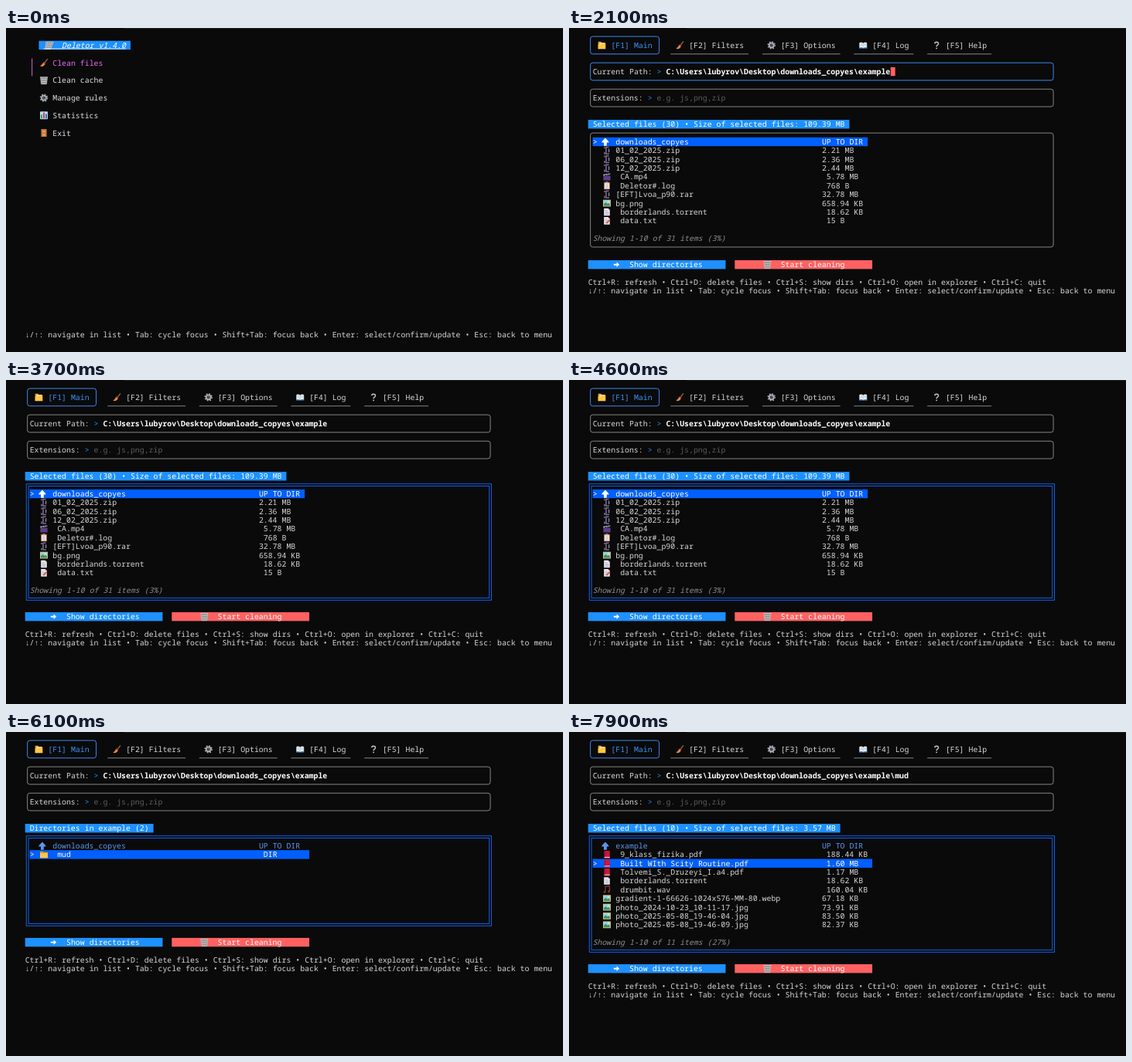
An HTML page for the animation above (8 s loop, 720x420 px).

```html
<!DOCTYPE html>
<html lang="en">
<head>
<meta charset="utf-8">
<title>Deletor</title>
<style>
  html, body { margin: 0; width: 100%; height: 100%; overflow: hidden; background: #0a0a0a; }
  svg { display: block; width: 720px; height: 420px; }
  text {
    font: 9.875px "Noto Sans Mono", "DejaVu Sans Mono", monospace;
    white-space: pre;
    text-rendering: geometricPrecision;
  }
  .bold { font-weight: 700; }
  .ital { font-style: italic; }
  .scene { visibility: hidden; }
</style>
</head>
<body>
<svg id="stage" viewBox="0 0 720 420">
  <defs>
    <g id="broom">
      <path d="M4.8-5L.4.6" stroke="#8d5a48" stroke-width="1.5"/>
      <path d="M-.8-.6L1.6 1.2Q.6 4.4-2.6 4.8L-5 4.2Q-2 2.6-.8-.6Z" fill="#e8893c"/>
      <path d="M-.9-.5L1.5 1.4" stroke="#c8433a" stroke-width="1.3"/>
    </g>
    <g id="bin">
      <path d="M-4.6-4H4.6L3.4 5H-3.4Z" fill="#777"/>
      <path d="M-5-4.2H5M-3.6-1.4H3.6M-3.3 1.6H3.3M-2.4-4L-1.8 5M0-4V5M2.4-4L1.8 5M-4.4-4L-3.4 4.8H3.4L4.4-4" fill="none" stroke="#cfcfcf" stroke-width=".8"/>
    </g>
    <g id="gear" fill="none" stroke="#a9acb3">
      <circle r="4.4" stroke-width="1.7" stroke-dasharray="1.73"/>
      <circle r="2.9" stroke-width="2"/>
      <circle r=".8" stroke-width=".7"/>
    </g>
    <g id="chart">
      <rect x="-5" y="-5" width="10" height="10" rx=".8" fill="#b9dcf0"/>
      <path d="M-3 4V-1" stroke="#35a45c" stroke-width="2"/>
      <path d="M0 4V-3.8" stroke="#d8404e" stroke-width="2"/>
      <path d="M3 4V-2" stroke="#2f72cf" stroke-width="2"/>
    </g>
    <g id="door">
      <rect x="-3.6" y="-5" width="7.2" height="10" rx=".5" fill="#c9743a"/>
      <path d="M-2-3.2H2V-.6H-2ZM-2 1H2V3.6H-2Z" fill="#e39a58"/>
    </g>
    <g id="tabs">
      <path d="M-4.8-4.6H-1L0-3.4H4.6V4.6H-4.8Z" fill="#e0a227"/>
      <path d="M-3-3H3.6V1H-3Z" fill="#f4ead0"/>
      <path d="M-4.8-1.2H-1L0-2.2H4.8V4.8H-4.8Z" fill="#fcc845"/>
    </g>
    <g id="folder">
      <path d="M-5-4.2H-1L0-3H5V4.4H-5Z" fill="#dd9c24"/>
      <path d="M-5-1.8H5V4.4H-5Z" fill="#fcc94a"/>
    </g>
    <g id="book">
      <path d="M-5.2-3H5.2V4.2H-5.2Z" fill="#3d84c6"/>
      <path d="M0-2.6Q-2.4-4.4-4.6-3.4V3Q-2 2.2 0 3.6Q2 2.2 4.6 3V-3.4Q2.4-4.4 0-2.6Z" fill="#f0f0f0"/>
      <path d="M0-2.6V3.4M-3.6-1.8H-1.2M-3.6 0H-1.2M1.2-1.8H3.6M1.2 0H3.6" stroke="#9aa3ad" stroke-width=".6"/>
    </g>
    <g id="ask">
      <path d="M-2.4-2.2Q-2.2-4.2.1-4.2Q2.6-4.1 2.5-2Q2.3-.6.8.2Q.1.7.1 1.8" fill="none" stroke="#c4c4c4" stroke-width="1.5"/>
      <circle cx=".1" cy="4" r=".95" fill="#c4c4c4"/>
    </g>
    <path id="up" d="M-1.7 0-5.4V0Z M-1.4-.2" fill="none"/>
    <path id="rise" d="M-1.8-5L2.6-.2V1H.1V5.4H-3.7V1H-6.2V-.2Z"/>
    <g id="zip">
      <path d="M2.6-4.4H-1V4.4H3" fill="none" stroke="#7d6a9e" stroke-width="1.5"/>
      <path d="M-3-4.6V-2.6M-3 2V4.8M2.6-2.4V2.4" stroke="#8c8c9a" stroke-width="1.3"/>
    </g>
    <g id="clap">
      <rect x="-4.6" y="-1.4" width="9.2" height="6" fill="#5b3f86"/>
      <path d="M-4.8-3.2L4.2-4.8L4.5-3L-4.6-1.4Z" fill="#b9a5d3"/>
      <path d="M-2.6-3.4L-1.4-2.2M.6-4L1.8-2.8M3.2-4.4L4-3.2" stroke="#41305e" stroke-width="1.1"/>
    </g>
    <g id="board">
      <rect x="-4" y="-4.6" width="8" height="9.6" rx=".6" fill="#b26a3c"/>
      <rect x="-3" y="-3.2" width="6" height="7.4" fill="#f1eef2"/>
      <path d="M-1.6-4.4H1.6" stroke="#9b9ba5" stroke-width="1.6"/>
      <path d="M-2-1H2M-2 .8H2M-2 2.6H2" stroke="#a39aae" stroke-width=".6"/>
    </g>
    <g id="pic">
      <rect x="-5" y="-4.4" width="10" height="8.8" fill="#d9c07c"/>
      <rect x="-4" y="-3.4" width="8" height="6.8" fill="#8fd0ee"/>
      <path d="M-4 3.4V1L-1.4-1L.6 1L2-.2L4 1.6V3.4Z" fill="#3f9258"/>
      <circle cx="2" cy="-1.9" r=".9" fill="#fff3b5"/>
    </g>
    <g id="page">
      <path d="M-3.8-4.8H1.6L3.8-2.6V4.8H-3.8Z" fill="#eeeaf2"/>
      <path d="M1.6-4.8V-2.6H3.8" fill="#b7afc2"/>
      <path d="M-2.4-2H.6M-2.4-.2H2.4M-2.4 1.4H2.4M-2.4 3H2.4" stroke="#9a92a6" stroke-width=".6"/>
    </g>
    <g id="memo">
      <use href="#page"/>
      <path d="M-.6 3.2L3.8-1.2" stroke="#e2583e" stroke-width="1.9"/>
    </g>
    <g id="pdf">
      <rect x="-3.6" y="-4.8" width="7.4" height="9.6" rx=".6" fill="#c9183a"/>
      <path d="M-3.2 3.6H3.8" stroke="#ecd9dc" stroke-width="1"/>
      <path d="M-2.4-4.8V3" stroke="#97102b" stroke-width=".8"/>
    </g>
    <g id="note" stroke="#8e3a36" fill="#8e3a36">
      <path d="M-2 3V-4L3.4-4.6V2.2" fill="none" stroke-width="1.2"/>
      <circle cx="-3" cy="3.1" r="1.3" stroke="none"/>
      <circle cx="2.4" cy="2.4" r="1.3" stroke="none"/>
    </g>
    <path id="next" d="M-3.6-.9H.2V-3.2L3.8 0L.2 3.2V.9H-3.6Z" fill="#fff"/>
  </defs>
</svg>
<script>
const LOOP = 8000, CW = 5.925, RH = 11.375;
const FG = '#d6d6d6', BLUE = '#1e90ff', RED = '#ff6161', RIM = '#3f86ea', DIM = '#858585', SEL = '#005fff';
const n = v => +v.toFixed(2);
const X = c => n(24.7 + CW * c);
const Y = r => n(22.35 + RH * r);

// Text on the cell grid, each word starting at its own column.
const text = (c, r, s, fill = FG, cls = '') =>
  `<text y="${n(Y(r) + 3.5)}" fill="${fill}" class="${cls}">` +
  s.replace(/\S+\s*/g, (w, i) => `<tspan x="${X(c + i)}">${w}</tspan>`) + '</text>';
const fillCells = (c, r, len, fill) =>
  `<rect x="${X(c)}" y="${n(Y(r) - RH / 2)}" width="${n(len * CW)}" height="${RH}" fill="${fill}"/>`;
const icon = (id, c, r, extra = '') => `<use href="#${id}" transform="translate(${X(c)} ${Y(r)}) ${extra}"/>`;
const frame = (c1, r1, c2, r2, color, grow = 0, round = 3) =>
  `<rect x="${n(X(c1 + .5) - grow)}" y="${n(Y(r1) - grow)}" width="${n((c2 - c1) * CW + 2 * grow)}" ` +
  `height="${n((r2 - r1) * RH + 2 * grow)}" rx="${round}" fill="none" stroke="${color}"/>`;
const label = (r, s) => fillCells(0, r, s.length + 2, BLUE) + text(1, r, s, '#fff');

const KEYS = '↓/↑: navigate in list • Tab: cycle focus • Shift+Tab: focus back • Enter: select/confirm/update • Esc: back to menu';
const MORE = 'Ctrl+R: refresh • Ctrl+D: delete files • Ctrl+S: show dirs • Ctrl+O: open in explorer • Ctrl+C: quit';

function menu() {
  const items = [['broom', 'Clean files'], ['bin', 'Clean cache'], ['gear', 'Manage rules'], ['chart', 'Statistics'], ['door', 'Exit']];
  return fillCells(3, 0, 20, BLUE) + icon('bin', 5.2, 0, 'skewX(-14)') +
    text(8, 0, 'Deletor v1.4.0', '#fff', 'ital') +
    `<path d="M${X(4)} 26.9H${X(22)}" stroke="#fff" stroke-width=".8"/>` +
    `<path d="M${X(1.5)} 39.4V62.2" stroke="#ad58b4" stroke-width="1.2"/>` +
    items.map(([id, s], i) => icon(id, 4.1, 2 + 2 * i) + text(6, 2 + 2 * i, s, i ? '#dedede' : '#e56bee')).join('') +
    text(0, 33, KEYS);
}

function tabs() {
  const rest = [['broom', 18, 17, '[F2] Filters'], ['gear', 38, 17, '[F3] Options'], ['book', 58, 13, '[F4] Log'], ['ask', 74, 14, '[F5] Help']];
  return frame(0, -1, 15, 1, RIM) + icon('tabs', 3, 0) + text(5, 0, '[F1] Main', '#3b92f7') +
    rest.map(([id, c, len, s]) => icon(id, c + 2, 0) + text(c + 4, 0, s) +
      `<path d="M${X(c)} ${Y(1)}H${X(c + len)}" stroke="${DIM}"/>`).join('');
}

function row([id, name, size, shift = 0], r, on) {
  const up = id === 'rise';
  const color = on ? '#fff' : up ? '#5c96f0' : FG;
  return (on ? fillCells(1, r, 60 + shift, SEL) + text(1, r, '>', '#fff') : '') +
    (up ? `<g fill="${color}">${icon(id, 4.05, r)}</g>` : icon(id, 4.1, r)) +
    text(6 + shift, r, name, color) + text(51 + shift, r, size, color);
}

function main({ path = HOME, focus = 'list', cursor = false, list, pick = 0 }) {
  const last = 11 + list.rows;
  const end = last + 1;
  const rim = f => focus === f ? RIM : DIM;
  let s = tabs() + frame(0, 2, 101, 4, rim('path')) + frame(0, 5, 101, 7, rim('ext')) +
    text(1, 3, 'Current Path:') + text(15, 3, '>', BLUE) + text(17, 3, path, '#fff', 'bold') +
    text(1, 6, 'Extensions:') + text(13, 6, '>', BLUE);
  if (cursor && focus === 'path') s += fillCells(17 + path.length, 3, 1, RED);
  if (cursor && focus === 'ext') s += fillCells(15, 6, 1, RED);
  s += text(15, 6, 'e.g. js,png,zip', '#5c5c5c') + label(9, list.title);
  s += focus === 'list'
    ? frame(0, 10, 101, last, '#0f62e8', 1.4, 0) + frame(0, 10, 101, last, '#0f62e8', -1.4, 0)
    : frame(0, 10, 101, last, DIM);
  s += list.items.map((it, i) => row(it, 11 + i, i === pick)).join('');
  if (list.note) s += text(1, 22, list.note, '#8c8c8c', 'ital');
  return s + fillCells(0, end + 1, 30, BLUE) + icon('next', 6.2, end + 1) + text(9, end + 1, 'Show directories', '#fff') +
    fillCells(32, end + 1, 30, RED) + icon('bin', 39.1, end + 1) + text(42, end + 1, 'Start cleaning', '#fff') +
    text(0, end + 3, MORE) + text(0, end + 4, KEYS);
}

const HOME = 'C:\\Users\\lubyrov\\Desktop\\downloads_copyes\\example';
const files = {
  title: 'Selected files (30) • Size of selected files: 109.39 MB',
  note: 'Showing 1-10 of 31 items (3%)',
  rows: 12,
  items: [
    ['rise', 'downloads_copyes', 'UP TO DIR'],
    ['zip', '01_02_2025.zip', '2.21 MB'],
    ['zip', '06_02_2025.zip', '2.36 MB'],
    ['zip', '12_02_2025.zip', '2.44 MB'],
    ['clap', 'CA.mp4', '5.78 MB', 1],
    ['board', 'Deletor#.log', '768 B', 1],
    ['zip', '[EFT]Lvoa_p90.rar', '32.78 MB'],
    ['pic', 'bg.png', '658.94 KB'],
    ['page', 'borderlands.torrent', '18.62 KB', 1],
    ['memo', 'data.txt', '15 B', 1]
  ]
};
const dirs = {
  title: 'Directories in example (2)',
  rows: 9,
  items: [['rise', 'downloads_copyes', 'UP TO DIR'], ['folder', 'mud', 'DIR', 1]]
};
const mud = {
  title: 'Selected files (10) • Size of selected files: 3.57 MB',
  note: 'Showing 1-10 of 11 items (27%)',
  rows: 12,
  items: [
    ['rise', 'example', 'UP TO DIR'],
    ['pdf', '9_klass_fizika.pdf', '188.44 KB', 1],
    ['pdf', 'Built WIth Scity Routine.pdf', '1.60 MB', 1],
    ['pdf', 'Tolvemi_S._Druzeyi_I.a4.pdf', '1.17 MB', 1],
    ['page', 'borderlands.torrent', '18.62 KB', 1],
    ['note', 'drumbit.wav', '160.04 KB', 1],
    ['pic', 'gradient-1-66626-1024x576-MM-80.webp', '67.18 KB'],
    ['pic', 'photo_2024-10-23_10-11-17.jpg', '73.91 KB'],
    ['pic', 'photo_2025-05-08_19-46-04.jpg', '83.50 KB'],
    ['pic', 'photo_2025-05-08_19-46-09.jpg', '82.37 KB']
  ]
};
// The note line follows the current row.
const inMud = pick => main({
  path: HOME + '\\mud', pick,
  list: { ...mud, note: mud.note.replace('27', [9, 18, 27][pick]) }
});

const scenes = [
  [0, menu()],
  [1600, main({ focus: 'path', list: files })],
  [2100, main({ focus: 'path', cursor: true, list: files })],
  [2600, main({ focus: 'path', list: files })],
  [3100, main({ focus: 'ext', cursor: true, list: files })],
  [3700, main({ list: files })],
  [4800, main({ list: dirs })],
  [5400, main({ list: dirs, pick: 1 })],
  [6700, inMud(0)],
  [7700, inMud(1)],
  [7900, inMud(2)]
];

// One keyframe rule per scene: visible only between its start and the next one's.
let css = '', body = '<path d="M152 .5H720" stroke="#1d1d1d"/>';
scenes.forEach(([t, art], i) => {
  const from = t / LOOP * 100;
  const to = (i + 1 < scenes.length ? scenes[i + 1][0] : LOOP) / LOOP * 100;
  css += `@keyframes s${i}{` + (from ? '0%{visibility:hidden}' : '') +
    `${from}%{visibility:visible}${to}%{visibility:hidden}` + (to < 100 ? '100%{visibility:hidden}' : '') + '}';
  body += `<g class="scene" style="animation:s${i} ${LOOP}ms step-end infinite">${art}</g>`;
});
document.head.appendChild(document.createElement('style')).textContent = css;
document.getElementById('stage').insertAdjacentHTML('beforeend', body);
</script>
</body>
</html>
```
